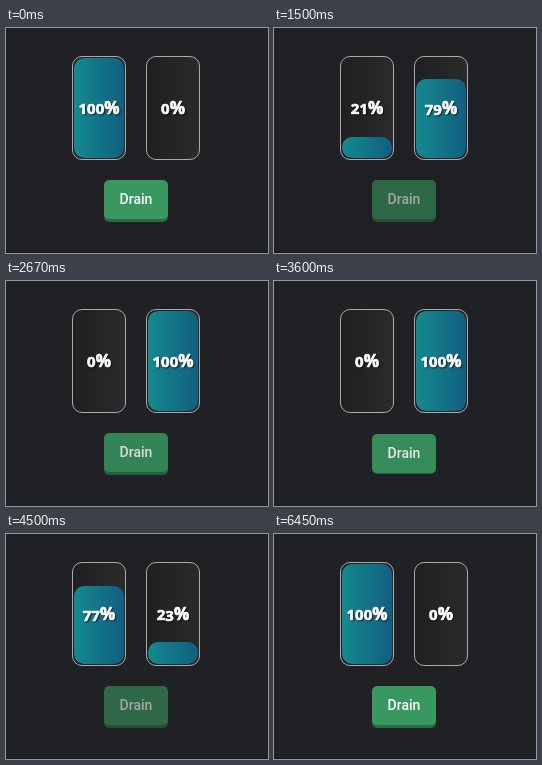
An HTML page with a canvas that plays this animation: 262x225 px, repeating every 6990 ms.

```html
<!DOCTYPE html>
<html lang="en">
<head>
<meta charset="utf-8">
<title>Drain</title>
<style>
  html, body { margin: 0; height: 100%; overflow: hidden; background: #202124; }
  canvas { display: block; }
</style>
</head>
<body>
<canvas width="262" height="225"></canvas>
<script>
const ctx = document.querySelector('canvas').getContext('2d');
const LOOP = 6990, TAU = 402, BUSY = 1940, FADE = 120;
const RUNS = [
  { click: 660, start: 864, from: 1 },
  { click: 3570, start: 3904, from: 0 },
];
const clamp = x => Math.max(0, Math.min(1, x));

function roundRect(x, y, w, h, r) {
  ctx.beginPath();
  ctx.roundRect(x, y, w, h, r);
}

function gradient(x0, x1, a, b) {
  const g = ctx.createLinearGradient(x0, 0, x1, 0);
  g.addColorStop(0, a);
  g.addColorStop(1, b);
  return g;
}

// Level of the left tank: an overdamped approach that snaps when the run ends
function leftLevel(t) {
  let level = 100;
  for (const { click, start, from } of RUNS) {
    if (t < start) break;
    const rest = t < click + BUSY ? 100 * Math.exp((start - t) / TAU) : 0;
    level = from ? rest : 100 - rest;
  }
  return level;
}

// Old-style figures: small digits, some hanging below the baseline
function drawPercent(cx, n) {
  const small = '900 15px "Noto Sans", sans-serif';
  const big = '900 17px "Noto Sans", sans-serif';
  const glyphs = [...`${n}%`].map(ch => {
    const font = ctx.font = ch === '%' ? big : small;
    return { ch, font, w: ctx.measureText(ch).width };
  });
  const left = cx - glyphs.reduce((sum, g) => sum + g.w, 0) / 2;
  const paint = method => {
    let x = left;
    for (const { ch, font, w } of glyphs) {
      ctx.font = font;
      ctx[method](ch, x, '34579'.includes(ch) ? 87 : 86);
      x += w;
    }
  };
  ctx.save();
  ctx.textAlign = 'left';
  ctx.fillStyle = ctx.strokeStyle = '#fff';
  ctx.lineWidth = .7;
  ctx.lineJoin = 'round';
  ctx.shadowColor = '#000';
  ctx.shadowBlur = 2;
  ctx.shadowOffsetX = ctx.shadowOffsetY = 1;
  paint('fillText');
  ctx.shadowColor = 'transparent';
  paint('strokeText');
  ctx.restore();
}

function drawTank(x, level, h) {
  roundRect(x + .5, 28.5, 53, 103, 9.5);
  ctx.fillStyle = gradient(x, x + 54, '#1f1f21', '#2b2b2c');
  ctx.fill();
  ctx.strokeStyle = '#a9aaac';
  ctx.stroke();

  if (h) {
    ctx.save();
    roundRect(x + 2, 30, 50, 100, 9);
    ctx.clip();
    roundRect(x + 2, 130 - h, 50, h, 10);
    ctx.fillStyle = gradient(x + 2, x + 52, '#15898f', '#115f81');
    ctx.fill();
    ctx.restore();
  }
  drawPercent(x + 27, Math.round(level));
}

function drawButton(t) {
  let dim = 0, press = 0;
  for (const { click } of RUNS) {
    const dt = t - click;
    dim += clamp(dt / FADE) - clamp((dt - BUSY) / FADE);
    if (dt >= 0 && dt < 150) press = 1;
  }
  ctx.save();
  ctx.translate(0, press);
  const height = 42 - 2 * press;
  roundRect(98, 152, 64, height, 5);
  ctx.clip();
  const mix = (on, off) => on.map((c, i) => c + (off[i] - c) * .4 * dim);
  const paint = c => `rgb(${mix(c, [32, 33, 36])})`;
  ctx.fillStyle = paint([42, 106, 69]);
  ctx.fillRect(98, 152, 64, height);
  roundRect(98, 152, 64, 39, 5);
  ctx.fillStyle = paint([56, 152, 95]);
  ctx.fill();
  ctx.fillStyle = paint([255, 255, 255]);
  ctx.font = '500 14px Roboto, sans-serif';
  ctx.textAlign = 'center';
  ctx.fillText('Drain', 130, 176);
  ctx.restore();
}

function draw(now) {
  const t = now % LOOP, left = leftLevel(t), h = Math.ceil(left);
  ctx.fillStyle = '#202124';
  ctx.fillRect(0, 0, 262, 225);
  ctx.fillStyle = '#17181a';
  ctx.fillRect(0, 224, 262, 1);
  drawTank(66, left, h);
  drawTank(140, 100 - left, 100 - h);
  drawButton(t);
}

const begin = performance.now();
function frame() {
  draw(performance.now() - begin);
  requestAnimationFrame(frame);
}
frame();
</script>
</body>
</html>
```
